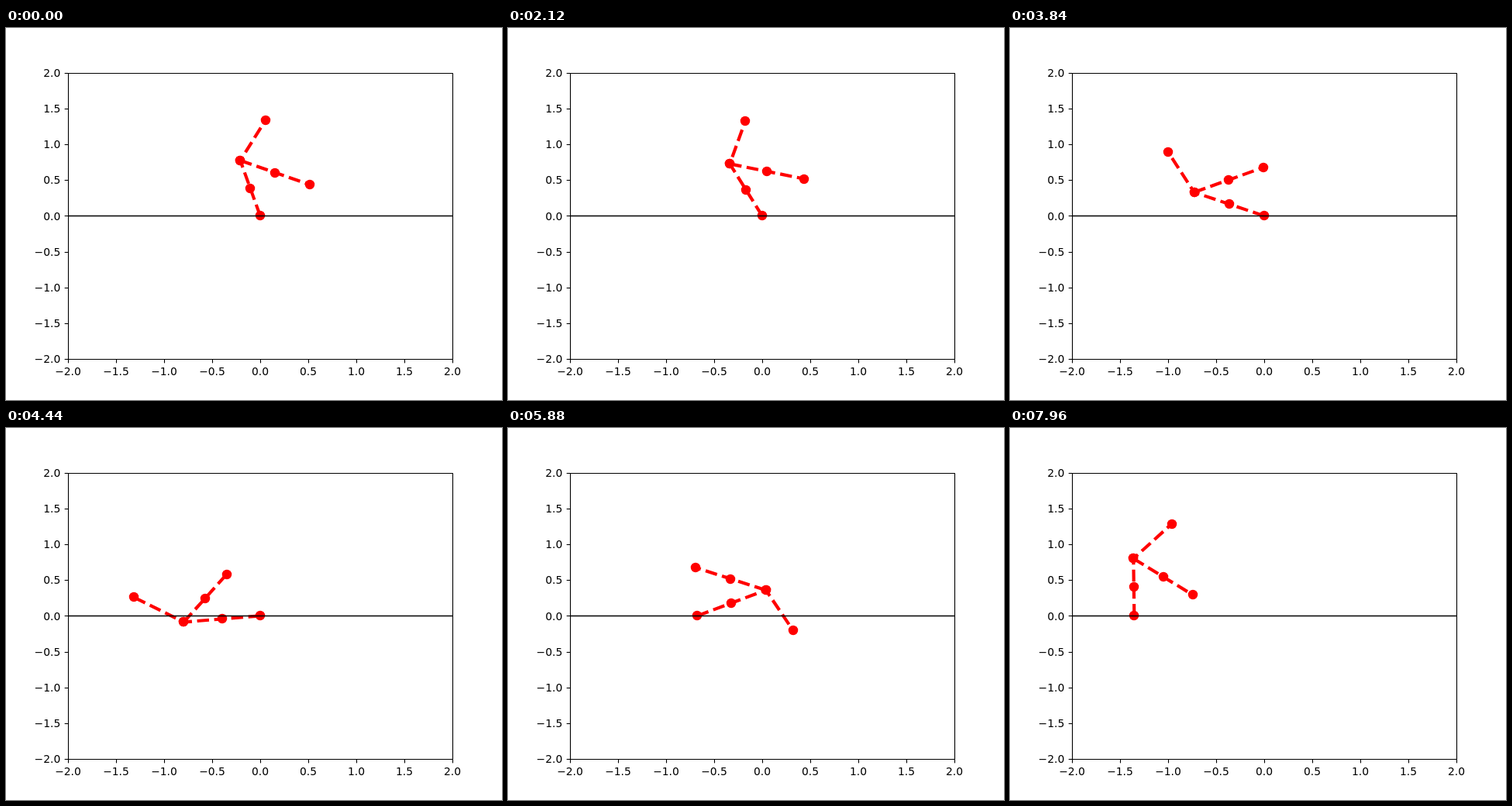
These frames come from a looping animation (640x480 px, 8000 ms). An HTML page with a canvas:

```html
<!DOCTYPE html>
<html lang="en">
<head>
<meta charset="utf-8">
<title>Rolling walker</title>
<style>
  html, body { margin: 0; width: 100%; height: 100%; overflow: hidden; background: #fff; }
  canvas { display: block; width: 640px; height: 480px; }
</style>
</head>
<body>
<canvas id="stage" width="640" height="480"></canvas>
<script>
const ctx = document.getElementById('stage').getContext('2d');

const LOOP = 8000, FRAME = 40;
const PT = 100 / 72;                 // points to pixels
const LEG = 0.8, TORSO = 0.625;
const SPREAD = 50, LEAN = 140;       // swing leg and torso, degrees from the first leg
const STEP = 2 * LEG * Math.sin(SPREAD / 2 * Math.PI / 180);
const RATE = 0.77;                   // pendulum rate, 1/s
const BALANCE = -81, START = 6;      // unstable balance and initial offset, degrees
const SWITCH_1 = 5.236, SWITCH_2 = 6.5;

const px = x => 328 + 124 * x;
const py = y => 242.4 - 92.4 * y;
const rad = deg => deg * Math.PI / 180;

// Direction of the first leg (hip to foot) in degrees
function legAngle(t) {
  if (t < SWITCH_1) {
    const quarter = Math.tan(rad(START / 4)) * Math.cosh(RATE * t);
    return BALANCE + 4 * Math.atan(quarter) / rad(1);
  }
  if (t < SWITCH_2) return 65 + 180 * (t - SWITCH_1) / (SWITCH_2 - SWITCH_1);
  const s = RATE * (t - 6.72);
  return BALANCE + 360 + 1.1 * Math.exp(s) - 29.3 * Math.exp(-s);
}

function along([x, y], length, deg) {
  return [x + length * Math.cos(rad(deg)), y + length * Math.sin(rad(deg))];
}

function pose(t) {
  const first = legAngle(t), second = first + SPREAD;
  const steps = t < SWITCH_1 ? 0 : t < SWITCH_2 ? 1 : 2;
  const [planted, free] = steps === 1 ? [second, first] : [first, second];
  const foot = [-STEP * steps, 0];
  const hip = along(foot, -LEG, planted);
  return {
    body: [foot, along(foot, -LEG / 2, planted), hip, along(hip, TORSO, first + LEAN)],
    swing: [hip, along(hip, LEG / 2, free), along(hip, LEG, free)]
  };
}

function drawLinks(points) {
  const lw = 3 * PT;
  ctx.strokeStyle = ctx.fillStyle = '#f00';
  ctx.lineWidth = lw;
  ctx.lineJoin = 'round';
  ctx.setLineDash([3.7 * lw, 1.6 * lw]);
  ctx.beginPath();
  for (const [x, y] of points) ctx.lineTo(px(x), py(y));
  ctx.stroke();
  ctx.setLineDash([]);
  for (const [x, y] of points) {
    ctx.beginPath();
    ctx.arc(Math.round(px(x)), Math.round(py(y)), 4.5 * PT, 0, 2 * Math.PI);
    ctx.fill();
  }
}

function line(x1, y1, x2, y2, width) {
  ctx.lineWidth = width;
  ctx.beginPath();
  ctx.moveTo(x1, y1);
  ctx.lineTo(x2, y2);
  ctx.stroke();
}

function drawAxes() {
  ctx.strokeStyle = ctx.fillStyle = '#000';
  ctx.font = 10 * PT + 'px "DejaVu Sans", sans-serif';
  ctx.textBaseline = 'alphabetic';
  line(80, 242.5, 576, 242.5, PT);
  const thin = 0.8 * PT, tick = 3.5 * PT;
  for (let v = -2; v <= 2; v += 0.5) {
    const label = v.toFixed(1).replace('-', '\u2212');
    const x = Math.round(px(v)) + 0.5, y = Math.round(py(v)) + 0.5;
    line(x, 427.5, x, 427.5 + tick, thin);
    line(80.5, y, 80.5 - tick, y, thin);
    ctx.textAlign = 'center';
    ctx.fillText(label, px(v), 448);
    ctx.textAlign = 'right';
    ctx.fillText(label, 70.3, Math.round(py(v) + 5.2));
  }
  ctx.lineWidth = thin;
  ctx.strokeRect(80.5, 58.5, 496, 369);
}

function draw(ms) {
  ctx.fillStyle = '#fff';
  ctx.fillRect(0, 0, 640, 480);
  const { body, swing } = pose(ms / 1000);
  drawLinks(body);
  drawLinks(swing);
  drawAxes();
}

const begin = performance.now();
function tick() {
  const ms = (performance.now() - begin) % LOOP;
  draw(Math.floor(ms / FRAME) * FRAME);
  requestAnimationFrame(tick);
}
tick();
</script>
</body>
</html>
```
